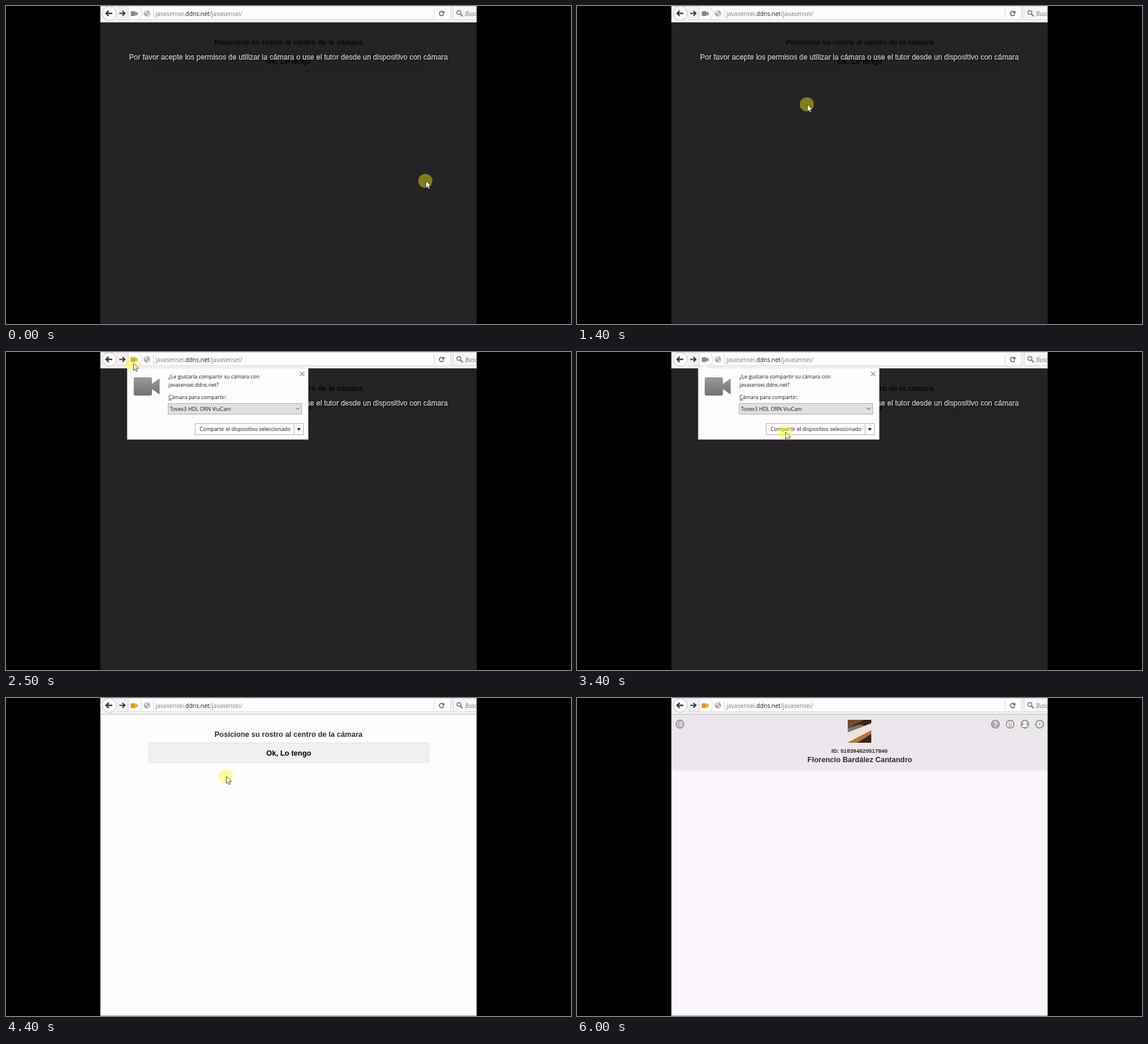
Animation of 960x540 px, one loop 6100 ms. Source, as an HTML page:

```html
<!DOCTYPE html>
<html lang="es">
<meta charset="utf-8">
<title>Permiso de cámara</title>
<style>
  html, body { margin: 0; width: 100%; height: 100%; overflow: hidden; background: #000; }
  svg { display: block; width: 960px; height: 540px; }
  .page { font: 12.5px "Liberation Sans", Arial, sans-serif; text-anchor: middle; }
  .bold { font-weight: bold; fill: #2f2d30; }
  .notice { fill: #fff; stroke: #fff; stroke-width: .4; text-shadow: 0 0 2px #000, 1px 1px 1px #000; }
  .ui { font: 10px "Open Sans", sans-serif; fill: #7b797c; }
  .dialog { font-size: 8.9px; fill: #1c1a1d; }
  .line { fill: none; stroke: #d3d0d4; }
  .stroke { fill: none; stroke-width: 1.5; }
</style>
<svg viewBox="0 0 960 540">
  <defs>
    <clipPath id="window"><path d="M160 0H800V540H160Z"/></clipPath>
    <linearGradient id="metal" x2="0" y2="1">
      <stop stop-color="#9c999d"/><stop offset="1" stop-color="#757276"/>
    </linearGradient>
    <path id="camera" d="M3 0H28Q31 0 31 3V11L44 2V29L31 20V28Q31 31 28 31H3Q0 31 0 28V3Q0 0 3 0Z"/>
    <path id="arrow" d="M-5.5 0H5M-1 -4.5L-5.5 0L-1 4.5" fill="none" stroke="#3b393c" stroke-width="2.4"/>
    <g id="disc"><circle r="10.8" fill="#d8d4d9"/><circle r="10" fill="#fff"/><circle r="8.2" fill="#aaa6ab"/></g>
  </defs>

  <g clip-path="url(#window)">
    <rect id="paper" x="160" width="640" height="540"/>

    <g id="welcome" class="page">
      <text class="bold" x="480" y="65.5">Posicione su rostro al centro de la cámara</text>
      <rect x="243" y="76" width="475.500" height="34" rx="3" fill="#f2eff3" stroke="#e2dfe3"/>
      <text x="480.500" y="97.500" font-weight="bold">Ok, Lo tengo</text>
    </g>

    <g id="profile" class="page">
      <path d="M160 28H800V123H160Z" fill="#ebe7ec"/>
      <path d="M460 37H500V76H460Z" fill="#3b241e"/>
      <path d="M460 37H488L460 51Z" fill="#77501f"/>
      <path d="M460 58L500 43V55L460 76Z" fill="#eee4dc"/>
      <path d="M460 76L500 55V61L476 76Z" fill="#b57931"/>
      <path d="M460 51L480 45L489 47L460 58Z" fill="#77747d"/>
      <text class="bold" x="480" y="92.500" font-size="9.6">ID: 518394620517846</text>
      <text class="bold" x="480.500" y="109">Florencio Bardález Cantandro</text>
      <g transform="translate(175 44.500)"><use href="#disc"/>
        <path class="stroke" stroke="#fff" d="M-4.500 -3H-3M-1.500 -3H4.500M-4.500 0H-3M-1.500 0H4.500M-4.500 3H-3M-1.500 3H4.500"/></g>
      <g transform="translate(711 44.500)"><use href="#disc"/>
        <text y="4.200" fill="#fff" font-size="12" font-weight="bold">?</text></g>
      <g transform="translate(736 44.500)"><use href="#disc"/>
        <path d="M-5 -3H-3L-2 -4.500H2L3 -3H5V4H-5Z" fill="#fff"/><circle r="2.300" cy=".3" class="stroke" stroke="#aaa6ab"/></g>
      <g transform="translate(761 44.500)"><use href="#disc"/>
        <path d="M-5 4.500Q-5 1.500 -1.500 1V0A3 3 0 1 1 1.500 0V1Q5 1.500 5 4.500Z" fill="#fff"/></g>
      <g transform="translate(786 44.500)"><use href="#disc"/>
        <circle r="3" class="stroke" stroke="#fff" style="stroke-width:2"/>
        <circle r="4.600" class="stroke" stroke="#fff" stroke-dasharray="1.800 1.810"/></g>
    </g>

    <path d="M160.500 0V540M799.500 0V540M160 539.500H800" fill="none" stroke="#807d81" opacity=".75"/>

    <g id="shade" class="page">
      <path d="M160 27H800V540H160Z" fill="#020003" opacity=".86"/>
      <text class="notice" x="480" y="91">Por favor acepte los permisos de utilizar la cámara o use el tutor desde un dispositivo con cámara</text>
    </g>

    <g class="ui">
      <path d="M161 0H799V27H161Z" fill="#f8f5f9"/>
      <path d="M188 1H755V23H188Z" fill="#fefcff"/>
      <path d="M188 1H207V23H188Z" fill="#f3f0f4"/>
      <path class="line" d="M160 .5H800M188 23.500H755.500V1M207.500 2V23M727.500 5V21M800 23.500H759.500V1"/>
      <path d="M160 27.500H800" stroke="#b9b6ba"/>
      <circle cx="175.500" cy="12.500" r="12" fill="#fdfbfe" stroke="#bcb9bd"/>
      <use href="#arrow" x="175.500" y="12.500"/>
      <use href="#arrow" transform="translate(197 12.500) scale(-.9 .9)"/>
      <g id="identity">
        <use id="badge" href="#camera" transform="translate(212 9) scale(.26)"/>
        <path class="line" d="M227 2L232 12.500L227 23"/>
      </g>
      <g id="address">
        <circle cx="239.500" cy="12.500" r="5.300" fill="#aaa7ab"/>
        <path d="M236 10Q238 7 241 9L239 12L236 13ZM240 13L243 12L242 16L240 17Z" fill="#ece9ed"/>
        <path class="line" d="M250.500 5V21"/>
        <text x="254" y="17">javasensei.<tspan fill="#1c1a1d">ddns.net</tspan>/javasensei/</text>
      </g>
      <path class="stroke" stroke="#5d5b5e" d="M743 10.200A3.800 3.800 0 1 0 743.800 14"/>
      <path d="M744.800 8V12.500H740.300Z" fill="#5d5b5e"/>
      <circle class="stroke" cx="769.500" cy="11" r="3.300" stroke="#777478"/>
      <path class="stroke" stroke="#777478" style="stroke-width:2" d="M772 13.500L776 17.500"/>
      <text x="780" y="17" font-style="italic">Buscar</text>
    </g>

    <g id="prompt" class="ui dialog">
      <path d="M206 27H211L217.500 20L224 27H513.500V148.500H206Z" fill="#fefcff" stroke="#c9c6ca" stroke-width=".6"/>
      <use href="#camera" x="217" y="43" fill="url(#metal)"/>
      <text x="276" y="45">¿Le gustaría compartir su cámara con</text>
      <text x="276" y="58.500">javasensei.ddns.net?</text>
      <text x="276" y="80"><tspan text-decoration="underline">C</tspan>ámara para compartir:</text>
      <path d="M499.500 33.500L507 41M507 33.500L499.500 41" stroke="#4a484b"/>
      <path d="M275.500 87.500H502.500V105.500H275.500Z" fill="#e3e0e4" stroke="#b0adb1"/>
      <text x="278.500" y="99.500">Tovex3 HDL ORN ViuCam</text>
      <path d="M492 94.500L495.500 98L499 94.500" fill="none" stroke="#444245"/>
      <path d="M321.500 121.500H505.500V140.500H321.500ZM489.500 121.500V140.500" fill="#fefcff" stroke="#b5b2b6"/>
      <text x="329" y="134">Compartir el dispositivo seleccionado</text>
      <path d="M494 129.500H501L497.500 133.500Z"/>
    </g>

    <g id="pointer">
      <circle cx=".5" r="12" fill="#ff0" fill-opacity=".42"/>
      <path transform="translate(1.500 0)" d="M0 0V12.200L2.800 9.600L4.700 14L6.700 13.100L4.900 8.800H8.700Z" fill="#fff" stroke="#222" stroke-width=".8"/>
    </g>
  </g>
</svg>
<script>
  const LOOP = 6100, STEP = 100;
  const part = id => document.getElementById(id);
  const show = (id, opacity) => part(id).setAttribute("opacity", +opacity);
  const move = (id, x, y) => part(id).setAttribute("transform", `translate(${x} ${y})`);

  // time, x, y of the pointer
  const path = [
    [0, 712, 297], [100, 712, 297], [300, 706, 296], [400, 706, 296], [600, 682, 289],
    [800, 627, 272], [1100, 553, 233], [1200, 500, 213], [1300, 440, 188], [1400, 390, 167],
    [1500, 290, 117], [1600, 239, 58], [1700, 222, 33], [1800, 217, 23], [1900, 215, 19],
    [2600, 215, 19], [2900, 235, 58], [3200, 290, 118], [3400, 353, 136], [3800, 373, 133],
    [4800, 373, 133], [5200, 456, 98], [5400, 456, 100], [5600, 457, 157],
    [5700, 486, 225], [5800, 538, 268], [5900, 638, 341], [LOOP, 638, 341]
  ];

  function pointerAt(t) {
    const i = path.findIndex(p => p[0] > t);
    const [t0, x0, y0] = path[i - 1], [t1, x1, y1] = path[i];
    const k = (t - t0) / (t1 - t0);
    return [x0 + (x1 - x0) * k, y0 + (y1 - y0) * k];
  }

  function draw(now) {
    const t = Math.floor(now % LOOP / STEP) * STEP;
    const allowed = t >= 4400, signedIn = t >= 5200;
    const noBadge = t >= 4100 && !allowed;
    const popup = Math.min((t - 2100) / 200, (4100 - t) / 200, 1);

    show("welcome", !signedIn);
    show("profile", signedIn);
    show("shade", !allowed);
    show("prompt", Math.max(0, popup));
    show("identity", !noBadge);
    show("pointer", t < 6000);
    part("paper").setAttribute("fill", signedIn ? "#faf6fc" : "#fefcff");
    part("badge").setAttribute("fill", allowed ? "#f39a14" : "#8b888c");
    move("address", noBadge ? -22 : 0, 0);
    move("pointer", ...pointerAt(t));
    requestAnimationFrame(draw);
  }
  requestAnimationFrame(draw);
</script>
</html>
```
